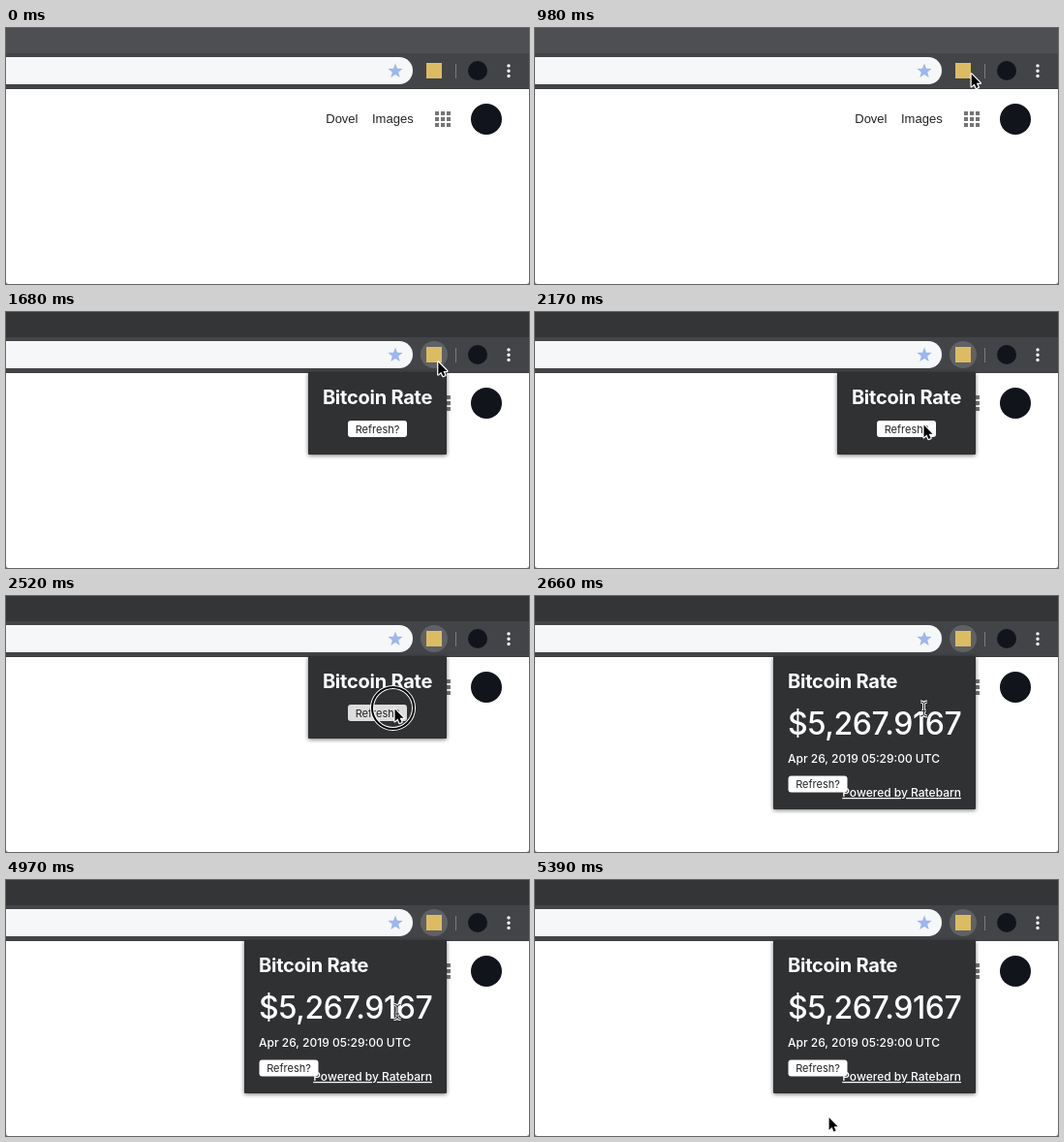
These frames come from a looping animation (540 by 264 pixels, 5.46 s). An HTML page:

```html
<!DOCTYPE html>
<html lang="en">
<head>
<meta charset="utf-8">
<title>Bitcoin Rate extension</title>
<style>
  html, body { margin: 0; width: 100%; height: 100%; overflow: hidden; background: #8a8b8d; }
  svg { display: block; width: 540px; height: 264px; }
  .nav { font: 13px "Liberation Sans", Arial, sans-serif; fill: #222; }
  .popup { font-family: Inter, "Noto Sans", sans-serif; fill: #fff; }
  .popup > rect { fill: #303133; filter: drop-shadow(0 1px 2px rgba(0, 0, 0, .55)); }
  .title { font-size: 20px; font-weight: 700; letter-spacing: -.012em; }
  .price { font-size: 32px; font-weight: 500; letter-spacing: -.014em; }
  .small { font-size: 12px; font-weight: 500; }
  .link { text-decoration: underline; }
  .down { fill: #ddd; }
  #refresh text { font-size: 11px; fill: #222; }
  #arrow { paint-order: stroke; }
</style>
</head>
<body>
<svg viewBox="0 0 540 264">
  <defs>
    <g id="refresh">
      <rect width="61" height="17" rx="3"/>
      <text x="30.5" y="12.5" text-anchor="middle">Refresh?</text>
    </g>
    <path id="bar" d="M-3.5-7.5Q0-7.5 0-5Q0-7.5 3.5-7.5M0-5V5M-3.5 7.5Q0 7.5 0 5Q0 7.5 3.5 7.5M-2 2H2"/>
  </defs>

  <path fill="#fff" d="M0 0H540V261Q540 264 537 264H3Q0 264 0 261Z"/>
  <rect id="strip" width="540" height="27"/>
  <rect y="26" width="540" height="37" fill="#434447"/>
  <rect y="62" width="540" height="1" fill="#3c3d40"/>
  <rect x="-20" y="30" width="440" height="28" rx="14" fill="#f6f7f8"/>
  <path id="star" fill="#9ab7ef"/>
  <circle id="hover" cx="442" cy="44" r="14" fill="#606164"/>
  <rect x="434" y="36" width="16" height="16" fill="#dcbc63"/>
  <path d="M464.5 37V52" stroke="#7b7c7f"/>
  <circle cx="487" cy="44" r="10" fill="#11141b"/>
  <path d="M519 38.9V50" stroke="#fff" stroke-width="3.4" stroke-linecap="round" stroke-dasharray="0 5.3"/>

  <g class="nav">
    <text x="363.5" y="98" text-anchor="end">Dovel</text>
    <text x="378" y="98">Images</text>
  </g>
  <path d="M445 86V102M451 86V102M457 86V102" stroke="#757575" stroke-width="4" stroke-dasharray="4 2"/>
  <circle cx="496" cy="94" r="16" fill="#11141b"/>

  <g id="ask" class="popup">
    <rect x="312" y="62" width="143" height="85" rx="1"/>
    <text class="title" x="383.5" y="95" text-anchor="middle">Bitcoin Rate</text>
    <use id="button" href="#refresh" x="353" y="112"/>
  </g>
  <g id="rate" class="popup">
    <rect x="246" y="62" width="209" height="158" rx="1"/>
    <text class="title" x="261" y="95">Bitcoin Rate</text>
    <text class="price" x="261" y="143">$5,267.9167</text>
    <text class="small" x="261" y="172">Apr 26, 2019 05:29:00 UTC</text>
    <use href="#refresh" x="261.5" y="185.5"/>
    <text class="small link" x="440" y="207" text-anchor="end">Powered by Ratebarn</text>
  </g>

  <g id="ring" fill="none">
    <circle stroke="#fff" stroke-width="4"/>
    <circle stroke="#000" stroke-width="2"/>
  </g>
  <g id="cursor">
    <path id="arrow" transform="scale(.82)" d="M0 0V15.5L3.6 12.2L6 17.6L8.6 16.5L6.2 11.3H11Z" fill="#000" stroke="#fff" stroke-width="3" stroke-linejoin="round"/>
    <g id="beam" fill="none">
      <use href="#bar" stroke="#fff" stroke-width="2.8"/>
      <use href="#bar" stroke="#222" stroke-width="1"/>
    </g>
  </g>
</svg>
<script>
const LOOP = 5460, STEP = 70;
const FOCUS = 1120, OPEN = 1680, LOADED = 2660;
const CLICKS = [{ at: 1190, end: 1540 }, { at: 2380, end: LOADED }];

// Pointer path: time, x, y
const PATH = [
  [70, 315, 212], [210, 353, 169], [350, 409, 123], [490, 447, 93], [560, 454, 80],
  [700, 453, 63], [840, 451.5, 53], [980, 450.7, 47.5], [1120, 450.7, 47.5], [1190, 450, 46],
  [1610, 450, 46], [1820, 439, 63], [2030, 412, 101], [2170, 401.5, 116.5],
  [4340, 401.5, 116.5], [4410, 402.5, 115],
  [4550, 422, 107], [4620, 428, 105], [4760, 428, 105],
  [4970, 404, 136], [5180, 336, 205], [5320, 305, 242], [5390, 303.6, 245]
];

const $ = id => document.getElementById(id);
const show = (id, on) => { $(id).style.display = on ? "" : "none"; };
const clamp = v => Math.max(0, Math.min(1, v));

const starPoints = Array.from({ length: 10 }, (_, i) => {
  const a = (i / 5 - .5) * Math.PI, r = i % 2 ? 3.4 : 8;
  return [402 + r * Math.cos(a), 44.5 + r * Math.sin(a)].map(v => v.toFixed(2));
});
$("star").setAttribute("d", "M" + starPoints.join("L") + "Z");

function pointerAt(t) {
  const i = PATH.findIndex(p => p[0] >= t);
  if (i <= 0) return PATH[0].slice(1);
  const [t0, x0, y0] = PATH[i - 1], [t1, x1, y1] = PATH[i];
  const k = (t - t0) / (t1 - t0);
  return [x0 + (x1 - x0) * k, y0 + (y1 - y0) * k];
}

function overText(t, x, y) {
  const inside = (l, top, r, bottom) => x >= l && x <= r && y >= top && y <= bottom;
  if (t >= LOADED) return inside(261, 100, 440, 150) || inside(261, 160, 418, 176);
  return t >= OPEN && inside(327, 77, 440, 100);
}

function drawRing(t, x, y) {
  const click = CLICKS.find(c => t > c.at && t < c.end);
  show("ring", click);
  if (!click) return;
  // The second ring holds while the rate loads
  const age = (t > 2520 ? 2520 : t) - click.at;
  const r = age * .15 + .5;
  $("ring").setAttribute("transform", `translate(${x - 2} ${y - 1})`);
  $("ring").setAttribute("opacity", 1 - clamp((r - 22) / 28));
  for (const c of $("ring").children) c.setAttribute("r", r);
}

function draw(now) {
  const t = Math.floor(now % LOOP / STEP) * STEP;
  const [x, y] = pointerAt(t);
  const text = overText(t, x, y);
  $("strip").setAttribute("fill", t < FOCUS ? "#4e4f52" : "#343537");
  $("hover").setAttribute("opacity", clamp((t - FOCUS) / 490));
  show("ask", t >= OPEN && t < LOADED);
  show("rate", t >= LOADED);
  $("button").classList.toggle("down", t >= 2450);
  show("cursor", t >= STEP);
  show("arrow", !text);
  show("beam", text);
  $("cursor").setAttribute("transform", `translate(${x} ${y})`);
  drawRing(t, x, y);
}

const start = performance.now();
function tick() {
  draw(performance.now() - start);
  requestAnimationFrame(tick);
}
tick();
</script>
</body>
</html>
```
